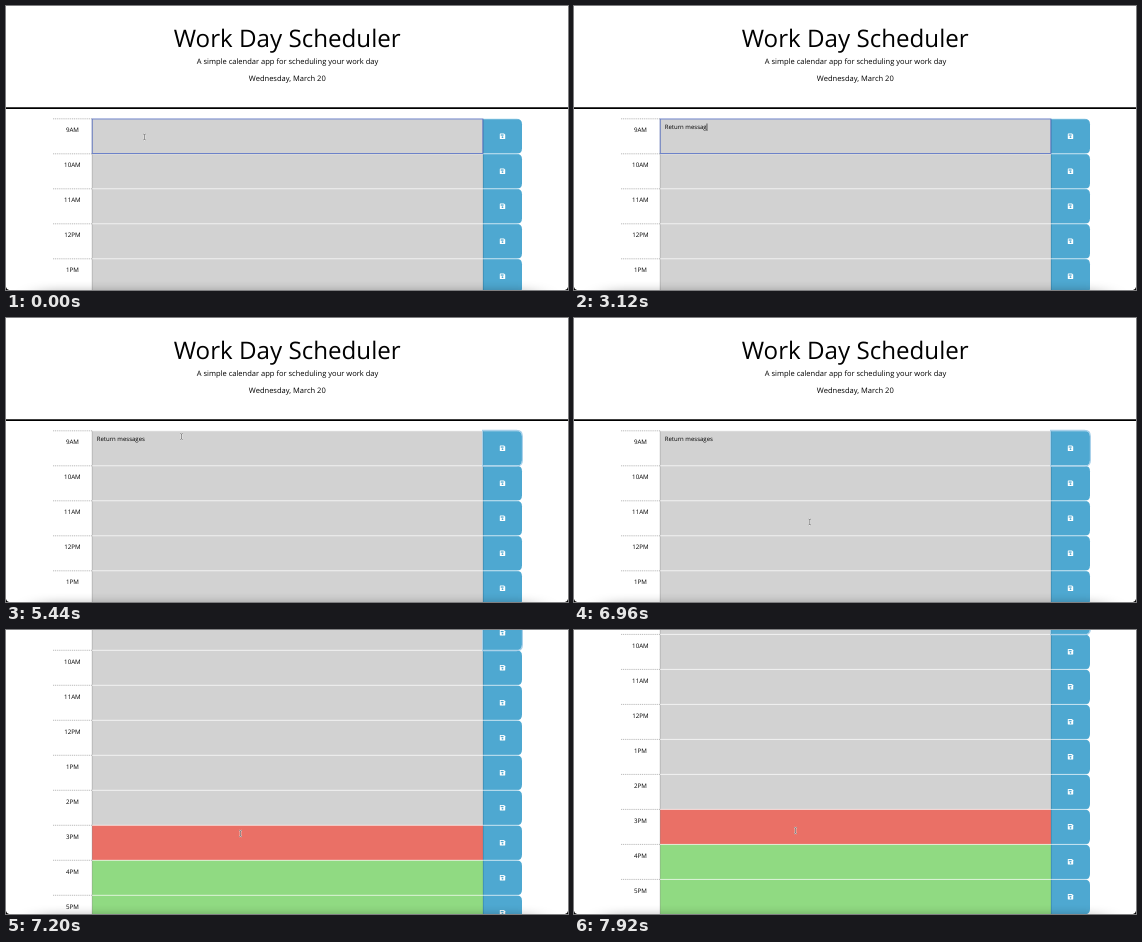
Animation of 562 by 284 pixels, one loop 8000 ms. Source, as an HTML page:

```html
<!DOCTYPE html>
<html lang="en">
<head>
<meta charset="utf-8">
<title>Work Day Scheduler</title>
<style>
html, body { margin: 0; width: 100%; height: 100%; overflow: hidden; background: #fff; }
svg { display: block; width: 562px; height: 284px; }
text { font-family: "Open Sans", sans-serif; font-size: 6px; fill: #000; text-rendering: geometricPrecision; }
.mid { text-anchor: middle; }
.lead { font-size: 7.54px; }
.label { font-size: 6.2px; }
</style>
</head>
<body>
<svg viewBox="0 0 562 284">
  <defs>
    <filter id="blur" filterUnits="userSpaceOnUse" x="0" y="255" width="562" height="70">
      <feGaussianBlur stdDeviation="12 5"/>
    </filter>
    <g id="save">
      <path d="M-2.2-2.7H1.5L2.7-1.5V2.2Q2.7 2.7 2.2 2.7H-2.2Q-2.7 2.7-2.7 2.2V-2.2Q-2.7-2.7-2.2-2.7Z" fill="#fff"/>
      <path d="M-1.8-1.8H1.1V-.5H-1.8Z" fill="#4ea8d1"/>
      <circle cy="1" r=".9" fill="#4ea8d1"/>
    </g>
  </defs>
  <g id="page">
    <text class="mid" x="281.2" y="40.5" style="font-size:24.15px">Work Day Scheduler</text>
    <text class="mid lead" x="281.5" y="57.5">A simple calendar app for scheduling your work day</text>
    <text class="mid lead" x="281.3" y="74.6">Wednesday, March 20</text>
    <path d="M0 102.2H562" stroke="#000" stroke-width="1.8"/>
    <g id="rows"></g>
    <rect id="field" x="86.2" y="113" width="390.6" height="34.5" fill="none" stroke="#6178c6" stroke-width=".9"/>
    <path id="ring" fill="none" stroke="#a6cfe9" stroke-width="1.1"/>
    <text id="note" x="90.8" y="123.4"></text>
    <path id="caret" stroke="#222" stroke-width=".7"/>
  </g>
  <rect x="32" y="284" width="498" height="20" opacity=".25" filter="url(#blur)"/>
  <path d="M0 281Q.5 283.5 3 284H0ZM562 281Q561.5 283.5 559 284H562Z"/>
  <g id="pointer">
    <g id="beam" fill="none">
      <path id="stem" d="M-1.3-3Q0-3 0-2Q0-3 1.3-3M0-2V2M-1.3 3Q0 3 0 2Q0 3 1.3 3" stroke="#fff" stroke-opacity=".5" stroke-width="1.5"/>
      <use href="#stem" style="stroke-opacity:1"/>
      <path d="M-1.3-3Q0-3 0-2Q0-3 1.3-3M0-2V2M-1.3 3Q0 3 0 2Q0 3 1.3 3" stroke="#555" stroke-width=".6"/>
    </g>
    <path id="hand" d="M-1-4Q0-5 .6-4V-1.2L3-.6V2L2 4H-1.4L-3 1Q-3-.4-1 .8Z" fill="#fff" stroke="#111" stroke-width=".6"/>
  </g>
</svg>
<script>
const $ = id => document.getElementById(id);
const LOOP = 8000, STEP = 80, TOP = 112.8, PITCH = 35;
const GRAY = '#d2d2d2', RED = '#ea7066', GREEN = '#90da82', BLUE = '#4ea8d1';
const NOTE = 'Return messages';
const keyTimes = [320, 480, 720, 880, 1120, 1280, 1520, 1920, 2080, 2320, 2560, 2800, 3040, 3360, 3680];
const charWidth = { R: 3.71, e: 3.37, t: 2.12, u: 3.68, r: 2.45, n: 3.68, ' ': 1.56, m: 5.58, s: 2.86, a: 3.34, g: 3.29 };
// time, x, y
const path = [
  [0, 138.5, 131], [4560, 138.5, 131], [4960, 494, 132], [5120, 494, 132], [5440, 175.5, 118.5],
  [6240, 483, 132], [6560, 497, 132], [6800, 497, 132], [6960, 235.7, 204],
  [7200, 234.5, 203.5], [7600, 234, 203], [7920, 221.5, 200.5], [LOOP, 221.5, 200.5]
];

// Button outline with rounded right corners, grown outwards by g.
const button = (y, g = 0) => `M${477 - g} ${y - g}H510.5Q${516 + g} ${y - g} ${516 + g} ${y + 5.5}V${y + 29.5}` +
  `Q${516 + g} ${y + 35 + g} 510.5 ${y + 35 + g}H${477 - g}Z`;

function row(hour, i) {
  const y = TOP + i * PITCH;
  const fill = hour < 15 ? GRAY : hour === 15 ? RED : GREEN;
  const label = (hour % 12 || 12) + (hour < 12 ? 'AM' : 'PM');
  return `<path d="M47 ${y}H86" stroke="#777" stroke-width=".5" stroke-dasharray="1.1 .8"/>
    <text class="mid label" x="66.4" y="${y + 13.4}">${label}</text>
    <rect x="86" y="${y}" width="391" height="35" fill="${fill}"/>
    <path d="M86.2 ${y}v35" stroke="#888" stroke-width=".4"/>
    <path d="${button(y)}" fill="${BLUE}"/>
    <path d="M477.3 ${y}v35" stroke="#357fa5" stroke-width=".6"/>
    <path d="M86 ${y}H516" stroke="#fff" stroke-opacity=".75" stroke-width=".8"/>
    <use href="#save" x="496.5" y="${y + 17.4}"/>`;
}

$('rows').innerHTML = Array.from({ length: 9 }, (_, i) => row(i + 9, i)).join('');
$('ring').setAttribute('d', button(TOP, .4));

const show = (id, on) => $(id).setAttribute('visibility', on ? 'visible' : 'hidden');

function pointerAt(t) {
  const i = path.findIndex((p, k) => k && t <= p[0]);
  const [t0, x0, y0] = path[i - 1], [t1, x1, y1] = path[i];
  const u = (t - t0) / (t1 - t0), e = u * u * (3 - 2 * u);
  return [x0 + (x1 - x0) * e, y0 + (y1 - y0) * e];
}

function draw(now) {
  const t = Math.floor(now % LOOP / STEP) * STEP;

  const typed = NOTE.slice(0, keyTimes.filter(k => k <= t).length);
  $('note').textContent = typed;
  const end = 90.8 + [...typed].reduce((w, c) => w + charWidth[c], 0);
  $('caret').setAttribute('d', `M${end + .3} 117.5V125`);
  show('caret', t >= 320 && t < 4000);

  const clicked = t >= 5040;
  show('field', !clicked);
  show('ring', clicked);

  const scroll = t > 6980 ? 143.4 * (1 - Math.exp((6980 - t) / 100)) : 0;
  $('page').setAttribute('transform', `translate(0 ${-scroll})`);

  const [x, y] = pointerAt(t), visible = t < 320 || t > 4560;
  $('pointer').setAttribute('transform', `translate(${x} ${y})`);
  show('beam', visible && x < 477);
  show('hand', visible && x >= 477);
  requestAnimationFrame(draw);
}
requestAnimationFrame(draw);
</script>
</body>
</html>
```
